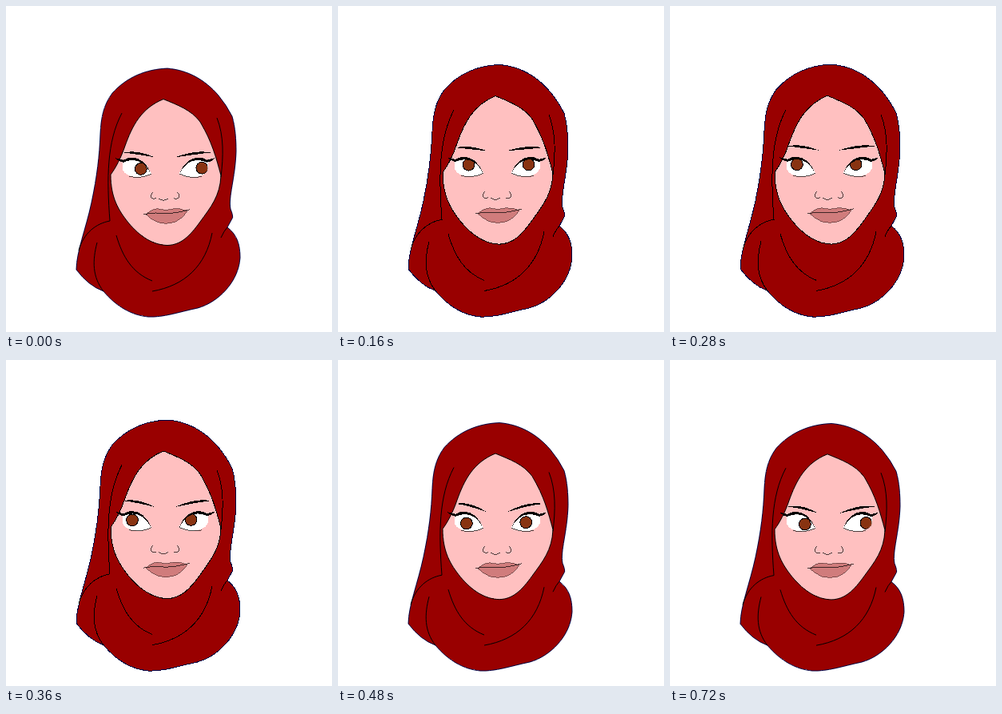
An HTML page that plays this animation: 408x408 px, repeating every 0.76 s.

```html
<!DOCTYPE html>
<html lang="en">
<head>
<meta charset="utf-8">
<style>
  html, body { margin: 0; width: 100%; height: 100%; overflow: hidden; background: #fff; }
  svg { display: block; width: 100vw; height: 100vh; shape-rendering: crispEdges; }
  .line { fill: none; stroke: #000; }
  .thin { stroke-width: .7; }
</style>
</head>
<body>
<svg viewBox="0 0 408 408">
  <defs>
    <path id="white" d="M146 195C153 188 173 188 182 210C171 218 149 215 146 205Z"/>
    <path id="lash" d="M137 190.500Q143 192 147 193C158 186 174 190 182 211C173 193 160 190 147 196Q141 195 137 190.500Z"/>
    <clipPath id="lid"><use href="#white"/></clipPath>
  </defs>

  <g id="head">
    <path fill="#990000" stroke="#000044" d="M202 78C227 80 249 92 266 112Q276 124 283 138C287 152 288 167 288 182C287 215 278 239 281 254Q285 264 283 266L277 277C289 286 293 298 293 315C291 346 265 371 240 378C216 383 197 390 178 389C157 387 138 376 122 357Q103 350 88 330C88 308 100 279 107 246C114 213 117 187 118 160C119 139 122 124 133 109C151 89 175 79 202 78Z"/>
    <path fill="#ffc0c0" stroke="#000" d="M197 116.500C169 128 158 150 149 175C144 190 137 203 131 211C131 240 141 256 153 271C168 289 184 299 202 299.500C219 299 230 288 243 270C256 252 268 238 269 212C263 190 258 170 243 145C232 130 215 124 197 116.500Z"/>
    <path class="line" d="M145 134C126 170 126 216 130 269C113 272 97 284 91 306M264 140C273 163 272 188 269 214M114 296C108 319 108 339 122 357M138 287C146 314 158 334 183 344M183 357C224 350 250 325 258 284M277 277Q273 281 269 290"/>
  </g>

  <g id="features">
    <path class="line thin" d="M184 233C180 237 180 243 188 241M191 241Q197 246 203 241M214 233C219 238 217 243 210 241"/>
    <path fill="#d07c7c" stroke="#533" stroke-width=".7" d="M175 261Q183 254 190 254Q200 257 210 254Q218 253 227 257Q219 268 210 271Q200 274 190 271Q181 267 175 261Z"/>
    <path class="line thin" d="M172 261Q188 258 199 260Q212 260 230 255"/>
    <g id="eyes"></g>
  </g>
  <path id="brows"/>
</svg>
<script>
const $ = id => document.getElementById(id);
const LOOP = 760, STEP = 40, REST = 560, MIRROR = 398.5;

$("eyes").innerHTML = ["", `translate(${MIRROR} 0) scale(-1 1)`].map(side => `
  <g transform="${side}">
    <use href="#white" fill="#fff"/>
    <g clip-path="url(#lid)"><circle class="iris" r="7.4" fill="#883311" stroke="#000"/></g>
    <path class="line thin" d="M154 213.500Q168 217 182 210.500"/>
    <use href="#lash"/>
  </g>`).join("");
const irises = document.querySelectorAll(".iris");

function brow(outerX, outerY, innerX, innerY) {
  const x = outerX + (innerX - outerX) * .4, y = outerY - 4;
  return `M${outerX} ${outerY}Q${x} ${y} ${innerX} ${innerY}Q${x} ${y + 6} ${outerX} ${outerY}Z`;
}

function look(iris, x, y) {
  iris.setAttribute("cx", x);
  iris.setAttribute("cy", y);
}

function draw(now) {
  const time = Math.floor(now % LOOP / STEP) * STEP;
  const active = Math.min(time, REST);

  // The head stretches up once, then rests while the gaze keeps circling.
  const lift = Math.sin(Math.PI * (active + 100) / (REST + 100)) ** 2;
  const arch = Math.sin(Math.PI * active / REST);
  const gaze = Math.cos(2 * Math.PI * (time + 30) / LOOP);

  const scale = (310.5 + 6.8 * lift) / 312;
  $("head").setAttribute("transform", `translate(0 ${390 * (1 - scale)}) scale(1 ${scale})`);
  $("features").setAttribute("transform", `translate(0 ${-1.2 * lift})`);

  const outer = 183.5 - 8 * arch, inner = 192 - 12 * lift;
  $("brows").setAttribute("d", brow(148, outer, 186.5, inner) + brow(256, outer, 211.5, inner));
  look(irises[0], 163.5 + 5.5 * gaze, 205.5 - 6.5 * lift);
  look(irises[1], MIRROR - 238.5 - 7 * gaze, 204 - 5 * lift);
  requestAnimationFrame(draw);
}
draw(performance.now());
</script>
</body>
</html>
```
